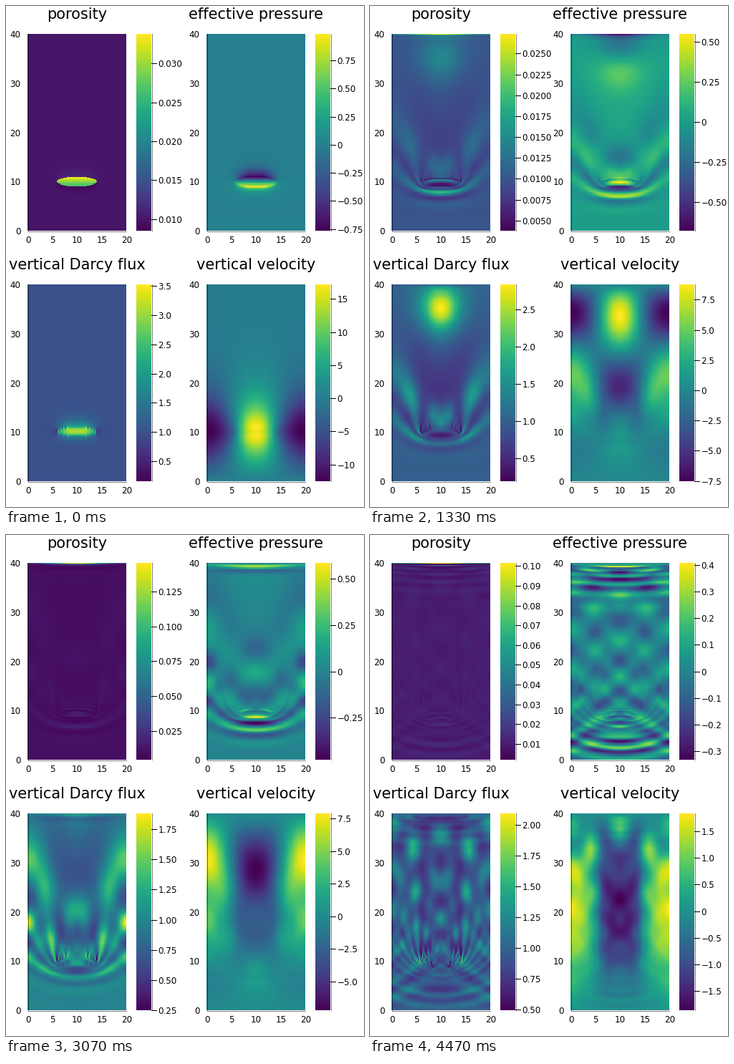
Recreate the animation shown at these times as a matplotlib script. Size 500 by 700 pixels, loop 4.54 s.

```python
import itertools
import math

import matplotlib.pyplot as plt
import numpy as np
from matplotlib.animation import FuncAnimation
from matplotlib.patches import Rectangle

FRAMES, LOOP_MS, STEPS = 68, 4540, 5

# Two-phase flow: porosity waves in a 20 x 40 box, solved on the left half
NX, NY = 64, 256
H = 10 / NX
PHI0, MU, DRIVE = 0.01, 0.001, 0.99
WALL_FLUX = 0.98


def cos_basis(n):
    k = np.arange(n)[:, None]
    c = np.cos(math.pi * k * (np.arange(n) + 0.5) / n) * math.sqrt(2 / n)
    c[0] /= math.sqrt(2)
    return c


def eigen(n):
    return (2 - 2 * np.cos(math.pi * np.arange(n) / n)) / H**2


CX, CY = cos_basis(NX), cos_basis(NY)
J = np.arange(1, NY)
SY = np.sin(math.pi * np.outer(J, J) / NY) * math.sqrt(2 / NY)
LAM = eigen(NY)[:, None] + eigen(NX)
LAM_V = LAM[1:]
LAM_P = LAM.copy()
LAM_P[0, 0] = np.inf


def mid_y(a):
    return (a[1:] + a[:-1]) / 2


def mid_x(a):
    return (a[:, 1:] + a[:, :-1]) / 2


def grad_y(a):
    return (a[1:] - a[:-1]) / H


def grad_x(a):
    return (a[:, 1:] - a[:, :-1]) / H


def divergence(fy, fx, wall=0.0):
    out = np.zeros((NY, NX))
    out[:-1] += fy
    out[1:] -= fy
    out[:, :-1] += fx
    out[:, 1:] -= fx
    out[0] -= wall
    out[-1] += wall
    return out / H


def total_pressure(lift):
    rhs = divergence(lift, np.zeros((NY, NX - 1)))
    return CY.T @ (CY @ rhs @ CX.T / -LAM_P) @ CX


def conjugate_gradient(ky, kx, g, rhs, p):
    """Solve -div(k grad p) + g p = rhs, starting from p."""
    ky, kx = ky / H**2, kx / H**2

    def apply(q):
        out = g * q
        fy = ky * (q[1:] - q[:-1])
        fx = kx * (q[:, 1:] - q[:, :-1])
        out[1:] += fy
        out[:-1] -= fy
        out[:, 1:] += fx
        out[:, :-1] -= fx
        return out

    diag = g.copy()
    diag[1:] += ky
    diag[:-1] += ky
    diag[:, 1:] += kx
    diag[:, :-1] += kx
    inv = 1 / diag
    p = p.copy()
    r = rhs - apply(p)
    z = inv * r
    d = z.copy()
    rz = np.vdot(r, z)
    for _ in range(250):
        if rz < 3e-5:
            break
        ad = apply(d)
        a = rz / np.vdot(d, ad)
        p += a * d
        r -= a * ad
        z = inv * r
        rz, old = np.vdot(r, z), rz
        d *= rz / old
        d += z
    return p


def whole(a):
    return np.hstack([a, a[:, ::-1]])


def snapshot(phi, pe, flux, pt, lift, div):
    force = (grad_y(pt) - lift) / MU + grad_y(div)
    vy = SY @ (SY @ force @ CX.T / -LAM_V) @ CX
    edge = np.full((1, NX), WALL_FLUX)
    flux = np.vstack([edge, flux, edge])
    return [whole(a) for a in (phi, pe, flux, np.pad(vy, ((1, 1), (0, 0))))]


def simulate():
    x = (np.arange(NX) + 0.5) * H
    y = (np.arange(NY)[:, None] + 0.5) * H
    phi = np.where(((x - 10) / 4) ** 2 + (y - 10) ** 2 < 1, 3 * PHI0, PHI0)
    pe = pe_old = np.zeros((NY, NX))
    rate_old, dt, dt_old = None, 1.0, 1.0
    shots = []
    for it in itertools.count(1):
        f = phi / PHI0
        g = f / (1 - phi)
        k = f**3
        ky, kx = mid_y(k), mid_x(k)
        lift = mid_y(phi) - PHI0
        pt = total_pressure(lift)
        drive_y, drive_x = DRIVE - grad_y(pt), -grad_x(pt)
        rhs = divergence(ky * drive_y, kx * drive_x, WALL_FLUX)
        guess = pe + (pe - pe_old) * (dt / dt_old if it > 3 else 0)
        pe_old, pe = pe, conjugate_gradient(ky, kx, g, rhs, guess)
        div = -g * pe
        if it % STEPS == 0:
            flux = ky * (grad_y(pe) + drive_y)
            shots.append(snapshot(phi, pe, flux, pt, lift, div))
            if len(shots) == FRAMES:
                return shots
        rate = (1 - phi) * div
        dt_old, dt = dt, 1e-3 / abs(div).max()
        slope = rate
        if rate_old is not None:
            slope = rate + (rate - rate_old) * dt / dt_old / 2
        phi = phi + dt * slope
        rate_old = rate


def tick_values(lo, hi):
    """Smallest round step that gives at most ten intervals."""
    for e, m in itertools.product(range(-5, 3), (1, 2.5, 5)):
        step = m * 10.0**e
        if (hi - lo) / step <= 10:
            break
    digits = max(0, (m == 2.5) - e)
    first, last = math.ceil(lo / step), math.floor(hi / step)
    return [(i * step, f"{i * step:.{digits}f}".replace("-", "−") if i else "0")
            for i in range(first, last + 1)]


# Layout, in pixels from the top left corner
W, HT = 138, 275
TITLE, SMALL = 15, 8.6

fig = plt.figure(figsize=(5, 7), dpi=100, facecolor="white")
ax = fig.add_axes([0, 0, 1, 1])
ax.axis("off")


def line(xs, ys, **style):
    return ax.plot(xs, ys, color="black", lw=0.72, **style)[0]


class Panel:
    def __init__(self, title, left, top, on_faces):
        self.top, self.base = top, top + HT
        right = left + W
        ax.text(left + W / 2, top - 20.5, title, size=TITLE, ha="center", va="baseline")
        for v in (0, 5, 10, 15, 20):
            ax.text(left + 0.5 + v * W / 20, self.base + 12, str(v), size=SMALL,
                    ha="center", va="center_baseline")
        for v in (0, 10, 20, 30, 40):
            ax.text(left - 9.5, self.base - v * HT / 40, str(v), size=SMALL,
                    ha="right", va="center_baseline")
        line([left + 0.5, left + 0.5, right], [top, self.base + 0.5, self.base + 0.5],
             alpha=0.5)

        pad = HT / NY / 2 if on_faces else 0
        self.im = ax.imshow(np.zeros((2, 2)), cmap="viridis", origin="lower", aspect="auto",
                            interpolation="nearest", zorder=1,
                            extent=(left, right, self.base + pad, top - pad))
        self.im.set_clip_path(Rectangle((left, top), W, HT, transform=ax.transData))

        bar = left + 152
        self.edge = bar + 21
        ax.imshow(np.linspace(0, 1, 256)[:, None], cmap="viridis", origin="lower",
                  aspect="auto", extent=(bar, self.edge, self.base, top), zorder=1)
        line([self.edge + 0.5] * 2, [top, self.base], alpha=0.5)
        self.ticks = line([], [])
        self.labels = [ax.text(self.edge + 9.5, 0, "", size=SMALL, va="center_baseline")
                       for _ in range(11)]

    def show(self, data):
        lo, hi = data.min(), data.max()
        self.im.set_data(data)
        self.im.set_clim(lo, hi)
        xs, ys = [], []
        for label in self.labels:
            label.set_text("")
        for label, (v, text) in zip(self.labels, tick_values(lo, hi)):
            y = self.base - (v - lo) / (hi - lo) * HT
            label.set_text(text)
            label.set_y(y)
            xs += [self.edge, self.edge + 7, np.nan]
            ys += [y, y, np.nan]
        self.ticks.set_data(xs, ys)


panels = [Panel("porosity", 30, 39, False),
          Panel("effective pressure", 280, 39, False),
          Panel("vertical Darcy flux", 30, 389, True),
          Panel("vertical velocity", 280, 389, True)]
ax.set_xlim(0, 500)
ax.set_ylim(700, 0)

shots = simulate()


def draw(i):
    for panel, data in zip(panels, shots[i]):
        panel.show(data)
    return []


anim = FuncAnimation(fig, draw, frames=FRAMES, interval=LOOP_MS / FRAMES,
                     repeat=True, repeat_delay=0, init_func=lambda: draw(0))
plt.show()
```
